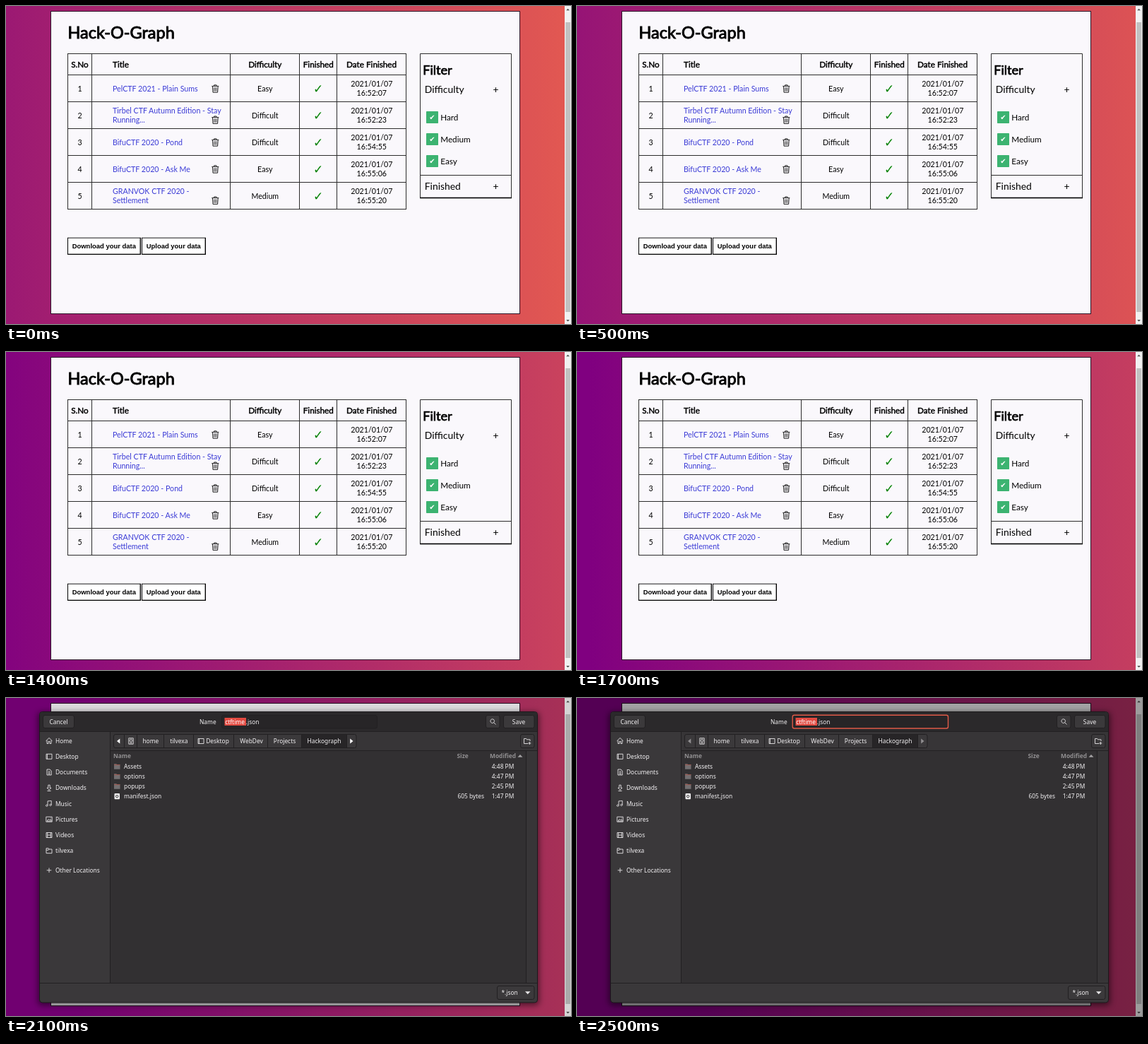
An HTML page that plays this animation: 800 by 450 pixels, repeating every 2.6 s.

```html
<!DOCTYPE html>
<html lang="en">
<head>
<meta charset="utf-8">
<title>Hack-O-Graph</title>
<style>
  html, body { margin: 0; width: 100%; height: 100%; overflow: hidden; background: #800080; }
  svg { display: block; width: 800px; height: 450px; }
  text { white-space: pre; }
  .page { font-family: Lato, sans-serif; }
  .dialog { font-family: "Noto Sans", sans-serif; }
</style>
</head>
<body>
<svg id="stage" viewBox="0 0 800 450" xmlns="http://www.w3.org/2000/svg">
  <defs>
    <linearGradient id="sky" gradientUnits="userSpaceOnUse" y1="0" y2="0">
      <stop offset="0" stop-color="#800080"/>
      <stop offset="1" stop-color="#ff7244"/>
    </linearGradient>
    <filter id="soft" x="-5%" y="-5%" width="110%" height="110%"><feGaussianBlur stdDeviation="4"/></filter>
  </defs>
</svg>
<script>
const LOOP = 2600, STEP = 100, OPEN = 2100;
const stage = document.getElementById('stage');
const sky = document.getElementById('sky');

function add(parent, tag, attrs, content) {
  const node = document.createElementNS('http://www.w3.org/2000/svg', tag);
  for (const key in attrs) node.setAttribute(key, attrs[key]);
  if (content !== undefined) node.textContent = content;
  parent.appendChild(node);
  return node;
}
const group = (parent, attrs = {}) => add(parent, 'g', attrs);
const rect = (parent, x, y, width, height, fill, more = {}) =>
  add(parent, 'rect', { x, y, width, height, fill, ...more });
const line = (parent, d, stroke = '#000', more = {}) =>
  add(parent, 'path', { d, stroke, fill: 'none', ...more });
const shape = (parent, d, fill) => add(parent, 'path', { d, fill });
const text = (parent, x, y, size, content, more = {}) =>
  add(parent, 'text', { x, y, 'font-size': size, ...more }, content);

const MID = { 'text-anchor': 'middle' };
const RULE = '#2c2c2c';
const thick = w => ({ stroke: '#000', 'stroke-width': w });

rect(stage, 0, 0, 800, 450, 'url(#sky)');
const page = group(stage, { class: 'page' });

function drawTrash(x, y) {
  const g = group(page, { transform: `translate(${x} ${y})` });
  line(g, 'M-5 -3.6H5M-1.7 -3.8V-5.2H1.7V-3.8', '#222', { 'stroke-width': 1 });
  line(g, 'M-3.9 -3.3L-3.3 5.2H3.3L3.9 -3.3', '#222', { 'stroke-width': 1 });
  line(g, 'M-1.7 -1.8V3.6M0 -1.8V3.6M1.7 -1.8V3.6', '#222', { 'stroke-width': .8 });
}

function drawTable() {
  const cols = [87.5, 121.5, 317.5, 415.5, 468.5, 566.5];
  const rows = [67.5, 97.5, 135.5, 173.5, 211.5, 249.5, 287.5];
  line(page, cols.map(x => `M${x} 67V288`).join('') + rows.map(y => `M87 ${y}H567`).join(''), RULE);

  const heads = [['S.No', 104.5], ['Difficulty', 366.8], ['Finished', 442.3], ['Date Finished', 517.6]];
  heads.forEach(([label, x]) => text(page, x, 87.2, 11.73, label, { ...MID, ...thick(.45) }));
  text(page, 151, 87.2, 11.73, 'Title', thick(.45));

  const tasks = [
    [['PelCTF 2021 - Plain Sums'], 'Easy', '16:52:07'],
    [['Tirbel CTF Autumn Edition - Stay', 'Running...'], 'Difficult', '16:52:23'],
    [['BifuCTF 2020 - Pond'], 'Difficult', '16:54:55'],
    [['BifuCTF 2020 - Ask Me'], 'Easy', '16:55:06'],
    [['GRANVOK CTF 2020 -', 'Settlement'], 'Medium', '16:55:20'],
  ];
  tasks.forEach(([title, level, time], i) => {
    const y = 117 + i * 38, two = title.length > 1;
    text(page, 104.5, y + 3.9, 10.67, i + 1, MID);
    title.forEach((part, n) =>
      text(page, 151, y + (two ? -2.7 + n * 12.8 : 3.9), 10.67, part, { fill: '#3b3bd6' }));
    drawTrash(296.3, y + (two ? 6.2 : 0));
    text(page, 366.8, y + 3.9, 10.67, level, MID);
    text(page, 442, y + 6, 17, '✓', { ...MID, fill: '#008000', 'font-family': '"DejaVu Sans", sans-serif' });
    text(page, 517.8, y - 2.7, 10.67, '2021/01/07', MID);
    text(page, 517.8, y + 10.1, 10.67, time, MID);
  });
}

function drawFilter() {
  line(page, 'M586.5 272V67.5H715.5V272M586 239.5H716', RULE);
  rect(page, 586, 270.7, 130, 1.6, '#000');
  text(page, 590.2, 97, 18.1, 'Filter', thick(.75));
  [['Difficulty', 123.1], ['Finished', 259.7]].forEach(([label, y]) => {
    text(page, 592.8, y, 13.87, label);
    text(page, 693.5, y, 13.87, '+', MID);
  });
  ['Hard', 'Medium', 'Easy'].forEach((label, i) => {
    const y = 157.5 + i * 31;
    rect(page, 595, y - 8.5, 17, 17, '#3cb371', { rx: .7 });
    text(page, 603.5, y + 3.6, 10, '✔', { ...MID, fill: '#fff', 'font-family': '"DejaVu Sans", sans-serif' });
    text(page, 615.2, y + 4.9, 11.73, label);
  });
}

function drawPageButton(x, w, label) {
  rect(page, x, 327.7, w, 24.3, '#000');
  rect(page, x + 1, 328.6, w - 2.4, 22.1, '#fff');
  text(page, x + w / 2 - .2, 342.9, 9.45, label,
    { ...MID, 'font-weight': 700, 'font-family': '"Liberation Sans", Arial, sans-serif' });
}

function drawScrollbar() {
  rect(page, 791, 0, 9, 450, '#f1f1f1');
  rect(page, 792.3, 23, 6.7, 410, '#c1c1c1');
  shape(page, 'M793.3 6.3L795.6 3.8L797.9 6.3Z', '#505050');
  shape(page, 'M793.3 444L795.6 446.5L797.9 444Z', '#505050');
}

rect(page, 63.5, 7.5, 664, 428, '#faf8fc', { stroke: '#2b1528', 'stroke-width': 1 });
text(page, 87.5, 46, 23.47, 'Hack-O-Graph', thick(.95));
drawTable();
drawFilter();
drawPageButton(87, 104, 'Download your data');
drawPageButton(192, 91, 'Upload your data');
drawScrollbar();

const shade = rect(stage, 0, 0, 800, 450, '#000');
const dialog = group(stage, { class: 'dialog', fill: '#f2f0f2' });
const FONT = 8.4, EDGE = '#222022', INK = '#e6e4e6';
const label = (x, y, content, more) => text(dialog, x, y + 3, FONT, content, more);
const box = (x, y, w, h, fill = '#3b393b') =>
  rect(dialog, x + .5, y + .5, w - 1, h - 1, fill, { stroke: EDGE, rx: 2.5 });

// Small outline icons, centred on the origin.
const icons = {
  home: 'M-4.5 .3L0 -4L4.5 .3M-3 -.5V4H-1V1H1V4H3V-.5',
  desk: 'M-4 -3.5H4V3.5H-4ZM-2.6 -3.5V3.5',
  doc: 'M-3 -4H1L3.2 -2V4H-3ZM-1.3 -1H1.5M-1.3 .8H1.5M-1.3 2.5H1.5',
  down: 'M-1.2 -4H1.2V0H3L0 3L-3 0H-1.2ZM-2.5 4.3H2.5',
  music: 'M-2 2.8V-3.6L3.2 -4V2M-2 2.8A1.3 1.1 0 1 1 -2 2.7M3.2 2A1.3 1.1 0 1 1 3.2 1.9',
  photo: 'M-4.2 -3.5H4.2V3.5H-4.2ZM-3 2.5L-.8 -.3L.8 1.2L2 0L3.4 2.5ZM1.8 -1.8H2.6',
  film: 'M-4 -3.5H4V3.5H-4ZM-2.3 -3.5V3.5M2.3 -3.5V3.5M-2.3 0H2.3',
  folder: 'M-4 -3.5H-.8L0 -2.2H4V3.5H-4ZM-4 -1H-1L0 -2.2',
  plus: 'M-3.3 0H3.3M0 -3.3V3.3',
  disk: 'M-3.2 -4.2H3.2V4.2H-3.2ZM2 -.8A2 2 0 1 1 2 -.9M-1.6 2.7H1.6M-.4 -.8H.4',
  lens: 'M2 -.8A2.8 2.8 0 1 1 2 -.9M1.2 1.2L4 4',
  newdir: 'M1 3.5H-4.5V-3.5H-1.3L-.5 -2.2H4V0M3.3 1V5M1.3 3H5.3',
};
const icon = (name, x, y) =>
  line(dialog, icons[name], INK, { transform: `translate(${x} ${y})`, 'stroke-width': .9 });

function drawFrame() {
  rect(dialog, 45, 20, 710, 415, '#000', { opacity: .5, rx: 5, filter: 'url(#soft)' });
  rect(dialog, 47.5, 19.5, 705, 411.5, '#3a383a', { rx: 4, stroke: '#1c1a1c' });
  shape(dialog, 'M48 47V24Q48 20 52 20H748Q752 20 752 24V47Z', '#2b292b');
  rect(dialog, 148, 47, 604, 27, '#373537');
  rect(dialog, 148, 74, 604, 329, '#323032');
  rect(dialog, 736, 75, 16, 328, '#373537');
  line(dialog, 'M48 47.5H752M147.5 48V403M148 74.5H752M48 403.5H752M736.5 75V403', EDGE);
}

function drawSidebar() {
  const places = [
    ['home', 'Home', 60.5], ['desk', 'Desktop', 82.8], ['doc', 'Documents', 105], ['down', 'Downloads', 127.2],
    ['music', 'Music', 149.5], ['photo', 'Pictures', 171.7], ['film', 'Videos', 194], ['folder', 'tilvexa', 216.2],
    ['plus', 'Other Locations', 243.8],
  ];
  places.forEach(([kind, name, y]) => { icon(kind, 61, y); label(70, y, name); });
}

function drawPath() {
  box(152, 51, 344.5, 20);
  rect(dialog, 419, 52, 63, 18, '#272527');
  line(dialog, [167.5, 185.5, 223.5, 265.5, 322.5, 370.5, 418.5, 482.5].map(x => `M${x} 51V71`).join(''), EDGE);
  icon('disk', 177, 61);
  icon('desk', 276, 61);
  const parts = [['home', 204.8], ['tilvexa', 244.8], ['Desktop', 299.5], ['WebDev', 347.5], ['Projects', 394.5], ['Hackograph', 450.5]];
  parts.forEach(([name, x]) => label(x, 61, name, MID));
  box(728, 51, 20.5, 20);
  icon('newdir', 738, 61);
}

function drawFiles() {
  const head = { 'font-weight': 700, fill: '#918f91' };
  label(152, 82, 'Name', head);
  label(638.5, 82, 'Size', head);
  label(685, 82, 'Modified', head);
  shape(dialog, 'M724.5 83.7L728 80L731.5 83.7Z', '#a3a1a3');
  const files = [['Assets', '4:48 PM'], ['options', '4:47 PM'], ['popups', '2:45 PM'], ['manifest.json', '1:47 PM', '605 bytes']];
  files.forEach(([name, time, size], i) => {
    const y = 97 + i * 14;
    if (size) {
      rect(dialog, 153.5, y - 4, 7.5, 8.2, '#f4f2f4', { rx: 1 });
      add(dialog, 'circle', { cx: 157.2, cy: y + .2, r: 1.7, fill: 'none', stroke: '#333' });
      label(677, y, size, { 'text-anchor': 'end' });
    } else {
      shape(dialog, `M153 ${y - 3.7}h3.3l1 1h4.2v6.5h-8.5z`, '#747072');
      rect(dialog, 153, y - 2.8, 8.5, .9, '#a4534a');
    }
    label(167, y, name);
    label(719.3, y, time, { 'text-anchor': 'end' });
  });
}

drawFrame();
drawSidebar();
drawPath();
drawFiles();
box(52, 24, 45, 19);
label(74.5, 33.5, 'Cancel', MID);
label(274, 33.5, 'Name');
box(305, 24, 221, 19.5, '#272527');
rect(dialog, 309.5, 28, 30.5, 11, '#e24a41');
label(310.2, 33.5, 'ctftime', { fill: '#fff' });
label(339.8, 33.5, '.json');
box(679, 24, 20.5, 19);
icon('lens', 689.5, 33.5);
box(704, 24, 44.5, 19);
label(726, 33.5, 'Save', MID);
box(695, 407, 53.5, 20);
label(701.5, 417, '*.json');
shape(dialog, 'M735 415.2H742.5L738.7 419.2Z', INK);
const arrows = [shape(dialog, 'M161.3 57.5V64.5L157 61Z', INK), shape(dialog, 'M487.2 57.5V64.5L491.5 61Z', INK)];
const ring = rect(dialog, 305.2, 24.3, 220.3, 18.7, 'none', { stroke: '#df5a48', 'stroke-width': 1.4, rx: 2.5 });

// Gradient share reached at the right edge, and the darkness of the page, over time.
const glow = [[0, .77], [500, .725], [900, .66], [1400, .58], [2000, .5], [2600, .43]];
const dim = [[2000, 0], [2100, .12], [2300, .35], [2600, .35]];

function at(keys, t) {
  if (t <= keys[0][0]) return keys[0][1];
  const i = keys.findIndex(k => k[0] >= t);
  const [t0, a] = keys[i - 1], [t1, b] = keys[i];
  return a + (b - a) * (t - t0) / (t1 - t0);
}

function draw() {
  const t = Math.floor(performance.now() % LOOP / STEP) * STEP;
  const span = 1430, x = 790 - at(glow, t) * span;
  sky.setAttribute('x1', x);
  sky.setAttribute('x2', x + span);
  const open = t >= OPEN, focused = t > OPEN;
  shade.setAttribute('opacity', open ? at(dim, t) : 0);
  dialog.setAttribute('visibility', open ? 'visible' : 'hidden');
  ring.setAttribute('opacity', focused ? 1 : 0);
  arrows.forEach(a => a.setAttribute('fill', focused ? '#918f91' : '#fff'));
  requestAnimationFrame(draw);
}
draw();
</script>
</body>
</html>
```
